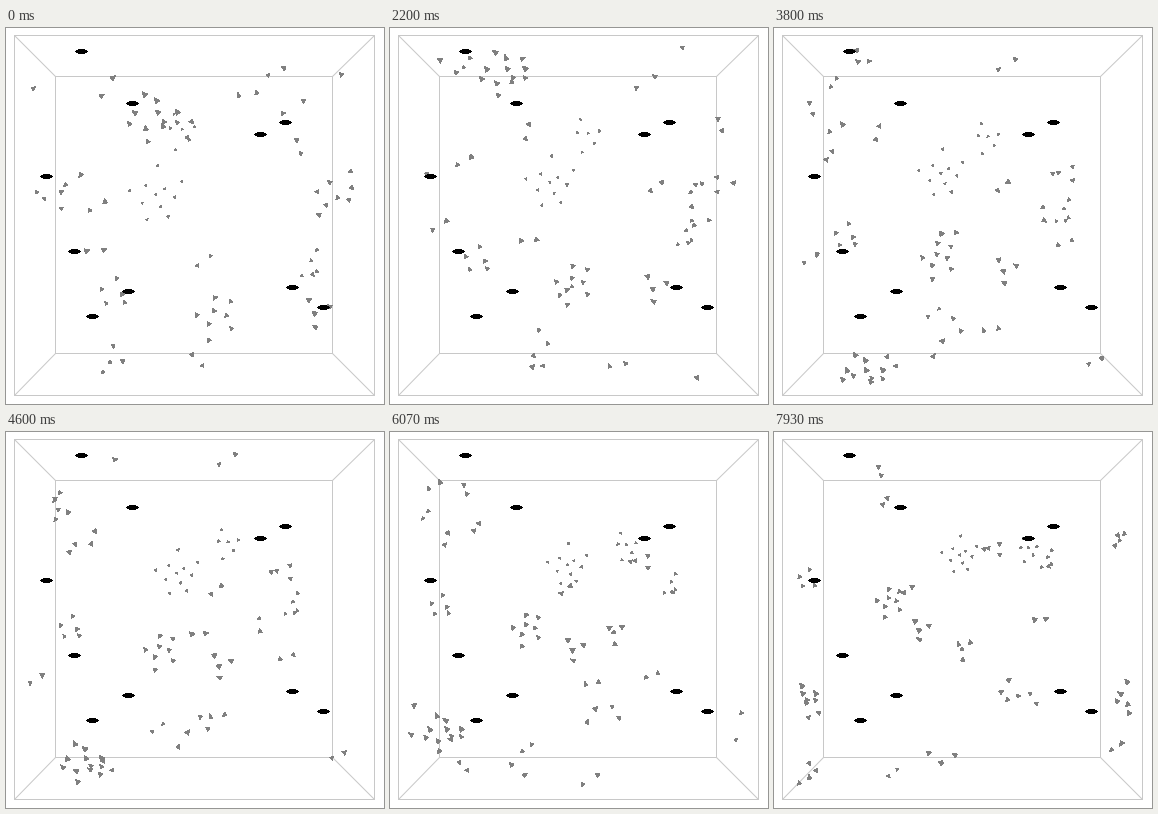
A matplotlib script that plays this animation: 378 by 376 pixels, repeating every 8000 ms.

```python
import numpy as np
import matplotlib.pyplot as plt
from matplotlib.animation import FuncAnimation
from matplotlib.collections import LineCollection, PolyCollection

W, H, DPI = 378, 376, 64
PIXEL = 72 / DPI
FRAMES, LOOP = 120, 8000
CENTER = np.array([188.0, 187.0])
NEAR, FAR = 360, 277  # room width at the front and at the back
SPEED = 25            # pixels per second in space
GOLDEN = np.pi * (3 - np.sqrt(5))

# members, starting point, velocity in pixels per second
FLOCKS = [
    (11, (150, 88), (-15.6, -20)),
    (8, (209, 285), (-12, -15)),
    (5, (108, 265), (-9.5, -15)),
    (11, (150, 165), (4.5, -5.5)),
    (6, (175, 105), (10, 1.7)),
    (5, (305, 240), (-4, -14)),
    (4, (312, 283), (-21, -11)),
    (4, (45, 172), (-17.5, -7)),
]
STRAY_PAIRS = 18

OBSTACLES = [(75, 23), (126, 75), (279, 94), (254, 106), (40, 148),
             (68, 223), (122, 263), (286, 259), (317, 279), (86, 288)]

rng = np.random.default_rng(4)


def stray_pair():
    heading = rng.uniform(0, 2 * np.pi)
    velocity = SPEED * rng.uniform(0.6, 0.95) * np.array([np.cos(heading), np.sin(heading)])
    return 2, CENTER + rng.uniform(-160, 160, 2), velocity


def members(count, start, velocity):
    """One row per boid: start, velocity, offset in the flock, room width."""
    room = rng.uniform(0.4, 0.75) * (NEAR - FAR) + FAR
    k = np.arange(count)
    radius = 6.5 * np.sqrt(k + 0.5)
    angle = rng.uniform(0, 2 * np.pi) + k * GOLDEN
    offset = np.stack([radius * np.cos(angle), radius * np.sin(angle)], 1)
    offset += rng.normal(0, 2, offset.shape)
    shared = np.tile([*start, *velocity], (count, 1))
    return np.hstack([shared, offset, np.full((count, 1), room)])


groups = FLOCKS + [stray_pair() for _ in range(STRAY_PAIRS)]
boids = np.vstack([members(*group) for group in groups])
START, VELOCITY, OFFSET, ROOM = np.split(boids, [2, 4, 6], axis=1)

# boids flying along the line of sight look shorter
visible = np.hypot(*VELOCITY.T) / SPEED
scale = ROOM[:, 0] / 320
LENGTH = 2.7 * scale * np.clip(visible, 0.45, 1) * rng.uniform(0.8, 1.1, len(boids))
WIDTH = 2.3 * scale * np.clip(1.3 * visible, 0.5, 1) * rng.uniform(0.7, 1.1, len(boids))
HEADING = np.arctan2(VELOCITY[:, 1], VELOCITY[:, 0])
TILT = rng.normal(0, 0.3, len(boids))
PHASE = rng.uniform(0, 2 * np.pi, len(boids))


def triangles(frame):
    u = frame / FRAMES
    gather = 1.3 - 0.45 * u
    pos = START + VELOCITY * u * LOOP / 1000 + OFFSET * gather
    pos = CENTER + (pos - CENTER + ROOM / 2) % ROOM - ROOM / 2

    angle = HEADING + TILT * np.cos(2 * np.pi * u + PHASE)
    ahead = np.stack([np.cos(angle), np.sin(angle)], 1) * LENGTH[:, None]
    side = np.stack([-np.sin(angle), np.cos(angle)], 1) * WIDTH[:, None]
    return np.stack([pos + ahead, pos - 0.8 * ahead + side,
                     pos - 0.8 * ahead - side], 1) + 0.5


def square(half):
    corners = np.array([(-1, -1), (1, -1), (1, 1), (-1, 1)])
    return np.floor(CENTER + half * corners) + 0.5


fig = plt.figure(figsize=(W / DPI, H / DPI), dpi=DPI, facecolor="white")
ax = fig.add_axes([0, 0, 1, 1])
ax.set(xlim=(0, W), ylim=(H, 0))
ax.axis("off")

near, far = square(NEAR / 2), square(FAR / 2)
edges = [np.vstack([s, s[:1]]) for s in (near, far)] + list(np.stack([near, far], 1))
ax.add_collection(LineCollection(edges, colors="#c8c8c8", linewidths=PIXEL, snap=False))

swarm = PolyCollection(triangles(0), facecolors="#808080", edgecolors="none",
                       antialiaseds=False, zorder=3)
ax.add_collection(swarm)

lens = np.array([(-6.5, 0), (-2, -2), (2, -2), (6.5, 0), (2, 2), (-2, 2)])
ax.add_collection(PolyCollection([lens + p + 0.5 for p in np.array(OBSTACLES)],
                                 facecolors="black", edgecolors="none",
                                 antialiaseds=False, zorder=4))


def update(frame):
    swarm.set_verts(triangles(frame))
    return [swarm]


anim = FuncAnimation(fig, update, frames=FRAMES, interval=LOOP / FRAMES,
                     repeat=True, repeat_delay=0, blit=False)
plt.show()
```
